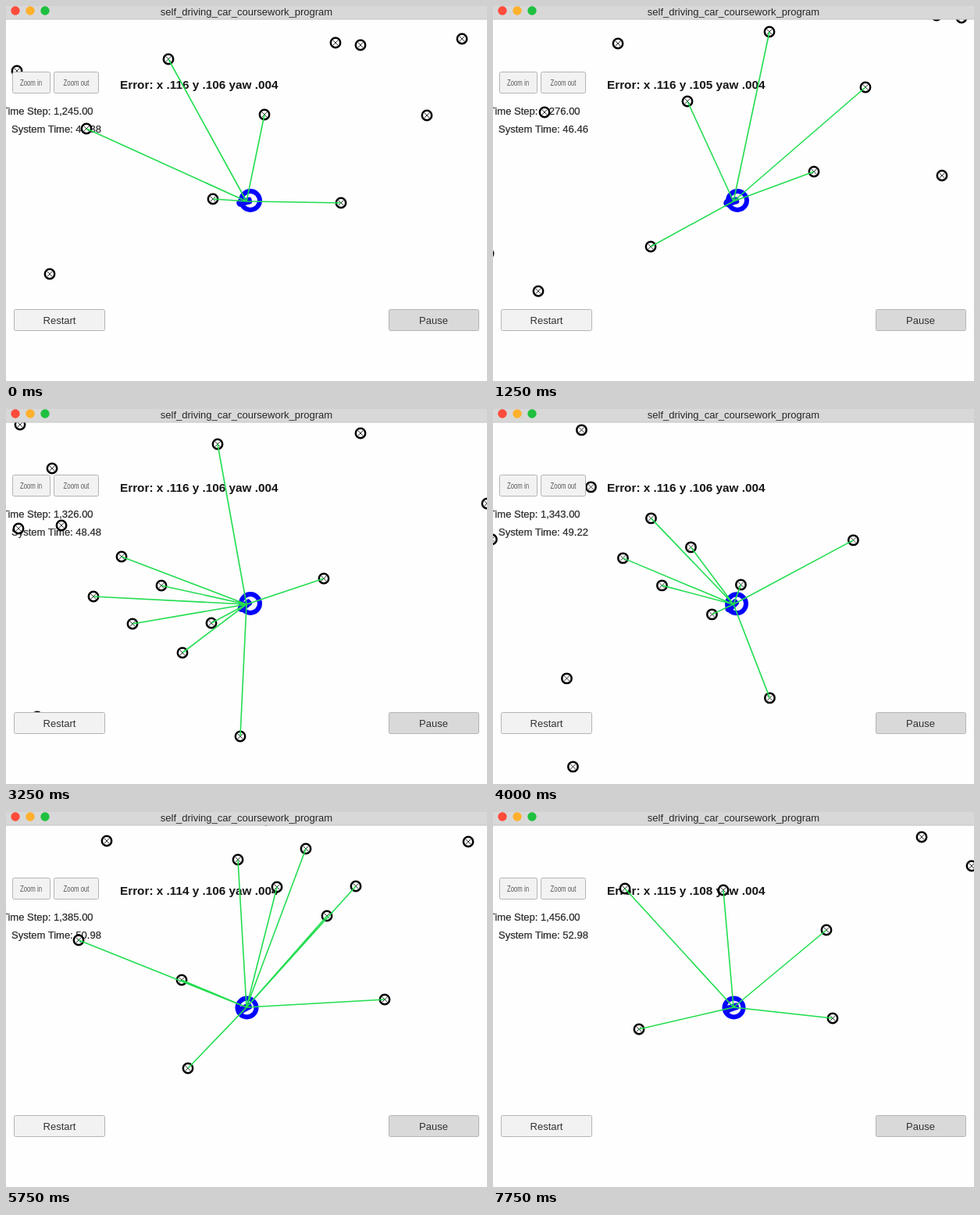
An HTML page for the animation above (8000 ms loop, 616x480 px).

```html
<!DOCTYPE html>
<html lang="en">
<head>
<meta charset="utf-8">
<title>Localisation simulator</title>
<style>
  html, body { margin: 0; width: 100%; height: 100%; overflow: hidden; background: #fdfefd; }
  svg { display: block; width: 616px; height: 480px; font: 13px "Liberation Sans", Arial, sans-serif; }
  .info { fill: #2c2c2c; stroke: #2c2c2c; stroke-width: .25; }
  .error { font-size: 15.3px; font-weight: bold; fill: #161616; }
  .button { fill: #f2f2f2; stroke: #b4b4b4; }
  .button.dark { fill: #d9d9d9; }
  .label { fill: #323232; text-anchor: middle; }
  .small { font-size: 10.4px; fill: #5a5a5a; }
  .title { fill: #262626; }
  .rays { stroke: #22dd50; stroke-width: 1.6; }
</style>
</head>
<body>
<svg viewBox="0 0 616 480">
  <defs>
    <g id="mark">
      <circle r="6.2" fill="#fdfefd" stroke="#000" stroke-width="2.5"/>
      <path d="M-3.5-3.5 3.5 3.5M3.5-3.5-3.5 3.5" stroke="#333"/>
    </g>
  </defs>

  <text class="error" id="error" x="146" y="106"></text>
  <text class="info" id="step" x="-5" y="139"></text>
  <text class="info" id="clock" x="7" y="162"></text>

  <g id="marks"></g>

  <g id="ring">
    <circle r="15" fill="#00f"/>
    <circle r="9" fill="#f4f4ff"/>
  </g>
  <g id="car" fill="#0a0af0">
    <rect x="-7" y="-4.5" width="18" height="9" rx="3"/>
    <circle cx="8" r="5"/>
  </g>
  <path class="rays" id="rays"/>

  <rect class="button" x="8.5" y="84.5" width="48" height="27" rx="2"/>
  <rect class="button" x="61.5" y="84.5" width="57" height="27" rx="2"/>
  <rect class="button" x="10.5" y="388.5" width="116" height="27" rx="2"/>
  <rect class="button dark" x="490.5" y="388.5" width="115" height="27" rx="2"/>
  <text class="label small" transform="translate(32 102) scale(.75 1)">Zoom in</text>
  <text class="label small" transform="translate(90 102) scale(.75 1)">Zoom out</text>
  <text class="label" x="68.5" y="407">Restart</text>
  <text class="label" x="547.5" y="407">Pause</text>

  <rect width="616" height="17" fill="#d8d8d8"/>
  <path d="M0 17H616" stroke="#c4c4c4"/>
  <circle cx="12" cy="6" r="5.7" fill="#ff4b3c"/>
  <circle cx="31" cy="6" r="5.7" fill="#ffb02c"/>
  <circle cx="50" cy="6" r="5.7" fill="#1fc03f"/>
  <text class="label title" x="308" y="12">self_driving_car_coursework_program</text>
</svg>

<script>
const LOOP = 8000, TICK = 250, RANGE = 232;
const CAR = { x: 308, y: 250 };

// The fixed map; only the camera moves
const landmarks = [
  [14, 83], [208, 68], [422, 47], [454, 50], [584, 42], [331, 139],
  [539, 140], [103, 157], [265, 247], [429, 252], [56, 343], [-80, 171],
  [-88, 400], [-152, 352], [-205, 112], [-203, 315], [-239, 366], [-189, 401],
  [-125, 438], [-51, 545], [-333, 146], [-292, 202], [-335, 279], [-280, 275],
  [-311, 520], [-407, 342], [-443, 469], [-303, 633], [-569, 467], [-551, 647]
];

// Key poses of the drive
const drive = [
  { t: 0, x: 0, y: 0, step: 1245, clock: 45.38 },
  { t: 1250, x: 146, y: -35, step: 1276, clock: 46.46 },
  { t: 2250, x: 268, y: -74, step: 1304, clock: 47.46 },
  { t: 3250, x: 351, y: -126, step: 1326, clock: 48.48 },
  { t: 4750, x: 459, y: -228, step: 1359, clock: 49.96 },
  { t: 5750, x: 536, y: -305, step: 1385, clock: 50.98 },
  { t: 7750, x: 738, y: -369, step: 1456, clock: 52.98 }
];
const LAST = drive.length - 1;

const $ = id => document.getElementById(id);
const bump = (t, mid, width) => Math.exp(-(((t - mid) / width) ** 2));

function ease(t, from, to) {
  const u = Math.min(1, Math.max(0, (t - from) / (to - from)));
  return u * u * (3 - 2 * u);
}

function segment(t) {
  let i = 0;
  while (i < LAST - 1 && t >= drive[i + 1].t) i++;
  const a = drive[i], b = drive[i + 1], span = b.t - a.t;
  return { i, a, b, span, u: (t - a.t) / span };
}

function linear(t, key) {
  const { a, b, u } = segment(t);
  return a[key] + (b[key] - a[key]) * u;
}

function slope(i, key) {
  const a = drive[Math.max(0, i - 1)], b = drive[Math.min(LAST, i + 1)];
  return (b[key] - a[key]) / (b.t - a.t);
}

// Cubic curve through the key poses
function smooth(t, key) {
  const { i, a, b, span, u } = segment(t), v = 1 - u;
  return a[key] * v * v * (1 + 2 * u) + b[key] * u * u * (3 - 2 * u)
    + span * u * v * (slope(i, key) * v - slope(i + 1, key) * u);
}

const marks = landmarks.map(() => {
  const use = document.createElementNS("http://www.w3.org/2000/svg", "use");
  use.setAttribute("href", "#mark");
  return $("marks").appendChild(use);
});

function place(el, x, y, angle = 0) {
  el.setAttribute("transform", `translate(${x} ${y}) rotate(${angle})`);
}

function draw(t) {
  const dx = smooth(t, "x"), dy = smooth(t, "y");
  let rays = "";
  landmarks.forEach(([wx, wy], i) => {
    const x = wx + dx, y = wy + dy;
    place(marks[i], x, y);
    if (Math.hypot(x - CAR.x, y - CAR.y) < RANGE) rays += `M${CAR.x} ${CAR.y}L${x} ${y}`;
  });
  $("rays").setAttribute("d", rays);

  // The car drives against the scroll direction
  const delta = key => smooth(t - 20, key) - smooth(t + 20, key);
  place($("car"), CAR.x, CAR.y, Math.atan2(delta("y"), delta("x")) * 180 / Math.PI);

  const settle = ease(t, 3250, 5750);
  place($("ring"), CAR.x + 5 - 4.5 * settle, CAR.y - 1 + 1.5 * settle);

  const errX = .116 - .0019 * bump(t, 6200, 1600);
  const errY = .106 - .0007 * bump(t, 1250, 500) + .002 * (t / 7750) ** 6;
  const short = n => n.toFixed(3).slice(1);
  $("error").textContent = `Error: x ${short(errX)} y ${short(errY)} yaw .004`;
  $("step").textContent = `Time Step: ${Math.round(linear(t, "step")).toLocaleString("en-US")}.00`;
  $("clock").textContent = `System Time: ${linear(t, "clock").toFixed(2)}`;
}

const start = performance.now();
let shown = -1;
function frame() {
  const t = Math.max(0, performance.now() - start) % LOOP;
  const tick = Math.floor(t / TICK) * TICK;
  if (tick !== shown) draw(shown = tick);
  requestAnimationFrame(frame);
}
frame();
</script>
</body>
</html>
```
